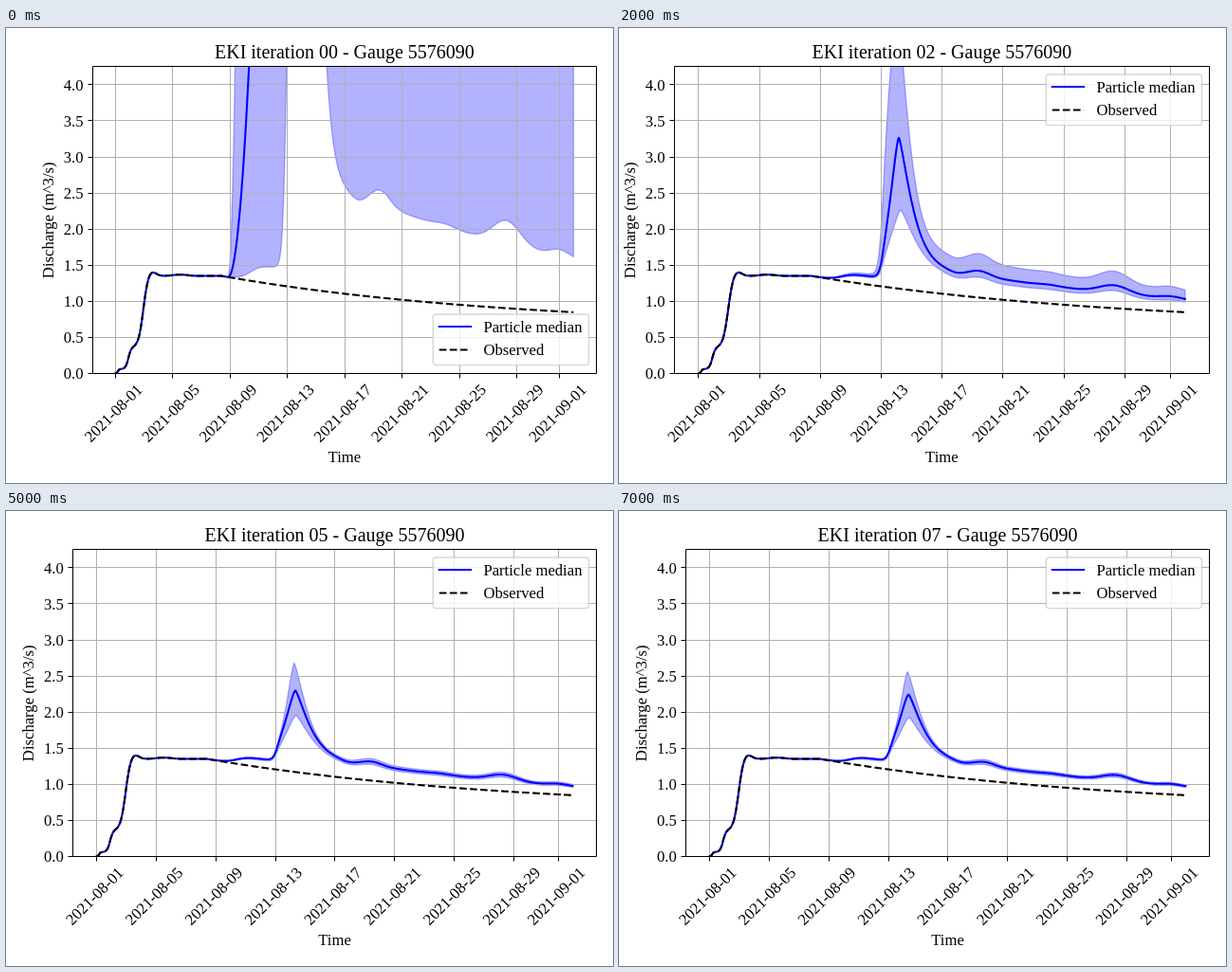
Recreate the animation shown at these times as an HTML page. Size 640x480 px, loop 8000 ms.

```html
<!DOCTYPE html>
<html lang="en">
<head>
<meta charset="utf-8">
<title>Discharge ensemble</title>
<style>
  html, body { margin: 0; width: 100%; height: 100%; overflow: hidden; background: #fff; }
  svg { display: block; width: 640px; height: 480px; }
  text { font: 16.67px "Liberation Serif", serif; fill: #000; }
  .title { font-size: 20px; }
  .mid { text-anchor: middle; }
  .end { text-anchor: end; }
  path { fill: none; }
  .grid { stroke: #b0b0b0; }
  .axis { stroke: #000; }
  .band { fill: #00f; fill-opacity: .3; stroke: #00f; stroke-opacity: .3; stroke-width: 1.39; }
  .median { stroke: #00f; stroke-width: 2.08; stroke-linejoin: round; stroke-linecap: square; }
  .observed { stroke: #000; stroke-width: 2.08; stroke-linejoin: round; stroke-dasharray: 7.71 3.33; }
  .box { fill: #fff; fill-opacity: .8; stroke: #ccc; stroke-opacity: .8; stroke-width: 1.39; }
</style>
</head>
<body>
<svg id="chart" viewBox="0 0 640 480"></svg>
<script>
const TOP = 40.5, BOTTOM = 364.5, RIGHT = 622.5, UNIT = 76.15, SPAN = 31.96, COUNT = 8;

const step = (d, at, width) => 1 / (1 + Math.exp((at - d) / width));
const bump = (d, at, width) => Math.exp(-(((d - at) / width) ** 2) / 2);

// Three rises to a plateau, then a slow recession
const observed = d =>
  .062 * step(d, .17, .05) + .3 * step(d, .9, .1) + .99 * step(d, 1.93, .17)
  + .07 * bump(d, 2.5, .3) + .018 * bump(d, 4.5, .5)
  - .718 * (1 - Math.exp(-Math.max(0, d - 7.4) / 20.4));

const recession = d => .38 * Math.exp((16 - d) / 24);
const showers = d => .075 * bump(d, 18.5, .65) - .025 * bump(d, 16.9, .5)
  + .015 * bump(d, 23, .7) + .12 * bump(d, 27.3, .95) + .035 * bump(d, 31, .7);

const flood = (t, rise, fall) =>
  Math.exp(-(t < 0 ? (-t / rise) ** 1.5 : (t / fall) ** 1.3));

// Observed flow plus an early rise, a flood peak and its tail
const river = ([peak, height, rise, fall, tail], early = .12, start = 12.05) => d => {
  const on = step(d, start, .15);
  return observed(d)
    + early * step(d, 9.4, .4) * (1 - on)
    + on * (height * flood(d - peak, rise, fall)
      + tail * recession(d) + tail ** .75 * showers(d));
};
const burst = k => d => observed(d) + Math.min(9, k * Math.max(0, d - 7.85) ** 2);

// Peak day, height, rise, fall, tail
const WIDE = {
  med: [13.08, 2.09, .68, 1.08, 1],
  hi: [13.05, 3.6, 1.1, .95, 1.6],
  lo: [13.27, .84, .9, 1.35, .68]
};
const NARROW = {
  med: [13.3, 1.03, .85, 1.18, .66],
  hi: [13.22, 1.55, .7, .95, .82],
  lo: [13.37, .665, .9, 1.35, .52]
};
const FINAL = {
  med: [13.36, .82, .85, 1.25, .6],
  hi: [13.29, 1.1, .7, 1.15, .68],
  lo: [13.4, .54, .9, 1.4, .51]
};
const blend = (a, b, k) => a.map((v, i) => v + (b[i] - v) * k);
const settled = n => (1 - .55 ** (n - 3)) / (1 - .55 ** 4);

function ensemble(n) {
  if (n === 0)
    return { med: burst(1.38), hi: burst(12), lo: river([13.2, 19, .91, .77, 3.75], .24, 11.9) };
  const pick = (key, early) => river(n < 3
    ? blend(WIDE[key], NARROW[key], n === 1 ? 0 : key === 'med' ? .35 : .15)
    : blend(NARROW[key], FINAL[key], settled(n)), early);
  return { med: pick('med'), hi: pick('hi', n < 3 ? .15 : .125), lo: pick('lo', .1) };
}

const DAYS = Array.from({ length: 801 }, (_, i) => i * SPAN / 800);
const snap = v => Math.floor(v) + .5;
const yOf = v => BOTTOM - v * UNIT;
const path = (cls, d) => `<path class="${cls}" d="${d}"/>`;
const label = (cls, x, y, s, turn = 0) =>
  `<text class="${cls}" transform="translate(${x} ${y}) rotate(${turn})">${s}</text>`;

function draw(n) {
  const left = n === 0 ? 91.3 : n < 3 ? 58.3 : 70.5;
  const edge = snap(left), centre = (left + RIGHT) / 2;
  const scale = (RIGHT - left) / 1.1 / SPAN, x0 = left + (RIGHT - left) / 22;
  const xOf = d => x0 + d * scale;
  const trace = (f, days = DAYS) =>
    days.map(d => xOf(d).toFixed(2) + ' ' + yOf(f(d)).toFixed(2)).join('L');
  const { med, hi, lo } = ensemble(n);

  let grid = '', ticks = '', text = '';
  for (let i = 0; i < 9; i++) {
    const d = Math.min(i * 4, 31), x = snap(xOf(d));
    grid += `M${x} ${TOP}V${BOTTOM}`;
    ticks += `M${x} ${BOTTOM}v5`;
    const date = new Date(Date.UTC(2021, 7, 1 + d)).toISOString().slice(0, 10);
    text += label('mid', xOf(d) + 1.6, 410.2, date, -45);
  }
  for (let v = 0; v < 4.25; v += .5) {
    const y = snap(yOf(v));
    grid += `M${edge} ${y}H${RIGHT}`;
    ticks += `M${edge} ${y}h-5`;
    text += label('end', left - 9.7, yOf(v) + 5.6, v.toFixed(1));
  }
  text += label('mid title', centre, 32, `EKI iteration 0${n} - Gauge 5576090`)
    + label('mid', centre, 458, 'Time')
    + label('mid', left - 41.5, 202.8, 'Discharge (m^3/s)', -90);

  const ly = n === 0 ? 302 : 49;
  const legend = `<rect class="box" x="450.3" y="${ly}" width="164.2" height="53.6" rx="3.3"/>`
    + path('median', `M456.8 ${ly + 13}H490.1`)
    + path('observed', `M456.8 ${ly + 37.5}H490.1`)
    + label('', 503.4, ly + 18.5, 'Particle median')
    + label('', 503.4, ly + 43, 'Observed');

  return `<clipPath id="area"><rect x="${edge}" y="${TOP}" width="${RIGHT - edge}" height="${BOTTOM - TOP}"/></clipPath>`
    + `<g clip-path="url(#area)">`
    + path('band', `M${trace(hi)}L${trace(lo, [...DAYS].reverse())}Z`)
    + path('grid', grid)
    + path('median', 'M' + trace(med))
    + path('observed', 'M' + trace(observed))
    + `</g>`
    + path('axis', `M${edge} ${TOP}H${RIGHT}V${BOTTOM}H${edge}Z${ticks}`)
    + text + legend;
}

const chart = document.getElementById('chart');
const views = Array.from({ length: COUNT }, (_, n) => draw(n));
let shown = -1;

function tick() {
  const n = Math.floor(performance.now() / 1000) % COUNT;
  if (n !== shown) chart.innerHTML = views[shown = n];
  requestAnimationFrame(tick);
}
tick();
</script>
</body>
</html>
```
